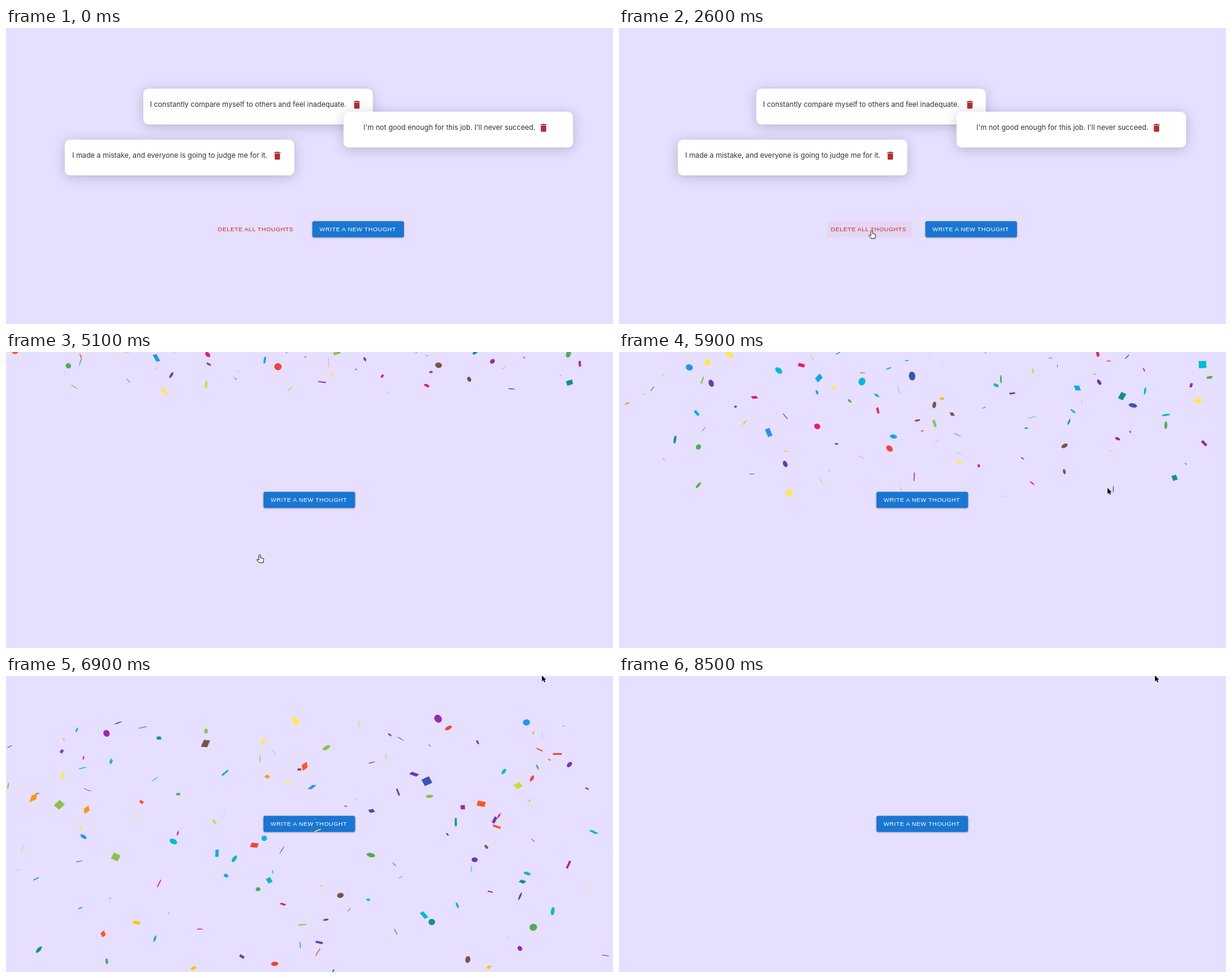
Animation, 999 px wide and 488 px high, one loop 8600 ms. Source, as an HTML page with a canvas:

```html
<!DOCTYPE html>
<html lang="en">
<head>
<meta charset="utf-8">
<title>Thoughts</title>
<style>
  html, body { margin: 0; width: 100%; height: 100%; overflow: hidden; background: #e6dfff; }
  svg, canvas { position: absolute; left: 0; top: 0; }
  .card rect { fill: #fff; filter: drop-shadow(0 3px 10px rgba(0, 0, 0, .2)); }
  .card text { font: 11.67px Inter, sans-serif; fill: #333; }
  .button { font: 9.8px "Liberation Sans", Arial, sans-serif; letter-spacing: .052em; }
  #write rect { fill: #1976d2; filter: drop-shadow(0 1px 1.2px rgba(0, 0, 0, .35)); }
  #write text { fill: #fff; }
  #delete text { fill: #c62828; }
  #hover { fill: rgba(211, 47, 47, .05); }
  #ring { fill: none; stroke: #101010; stroke-width: 1.8; }
</style>
</head>
<body>
<svg width="999" height="488" viewBox="0 0 999 488">
  <g id="thoughts">
    <g id="cards"></g>
    <g id="delete" class="button">
      <rect id="hover" x="342.5" y="318.3" width="139" height="26.7" rx="3"/>
      <rect id="ring" x="342.9" y="318.4" width="138.2" height="26.6" rx="3"/>
      <text x="348.6" y="334.9">DELETE ALL THOUGHTS</text>
    </g>
  </g>
  <g id="write" class="button">
    <rect width="150.8" height="26.5" rx="3"/>
    <text x="11.7" y="16.6">WRITE A NEW THOUGHT</text>
  </g>
</svg>
<canvas id="overlay" width="999" height="488"></canvas>
<script>
const LOOP = 8600, STEP = 100;
const CLICK = 3800, CLEARED = 4100, BURST = 4140;
const byId = id => document.getElementById(id);
const ctx = byId('overlay').getContext('2d');

const cards = [
  { x: 226, y: 100, textX: 11, text: 'I constantly compare myself to others and feel inadequate.', iconX: 342.7 },
  { x: 555.5, y: 138, textX: 32.8, text: "I'm not good enough for this job. I'll never succeed.", iconX: 320.4 },
  { x: 96.8, y: 184, textX: 12.2, text: 'I made a mistake, and everyone is going to judge me for it.', iconX: 341 }
];
byId('cards').innerHTML = cards.map(c => `
  <g class="card" transform="translate(${c.x} ${c.y})">
    <rect width="377.7" height="59" rx="8.75"/>
    <text x="${c.textX}" y="29.6">${c.text}</text>
    <g transform="translate(${c.iconX} 17.8) scale(.729)">
      <path fill="#b72d2d" d="M6 19c0 1.1.9 2 2 2h8c1.1 0 2-.9 2-2V7H6z"/>
      <path fill="#962a35" d="M19 4h-3.5l-1-1h-5l-1 1H5v2h14z"/>
    </g>
  </g>`).join('');

// Confetti: one burst from the top edge, thrown upward and pulled back by gravity.
const GRAVITY = 163, PIECES = 180;
const colors = ['#f44336', '#e91e63', '#9c27b0', '#673ab7', '#3f51b5', '#2196f3', '#03a9f4', '#00bcd4',
  '#009688', '#4caf50', '#8bc34a', '#cddc39', '#ffeb3b', '#ffc107', '#ff9800', '#ff5722', '#795548'];
let seed = 20;
const random = (min, max) => {
  seed = (seed * 16807) % 2147483647;
  return min + (max - min) * seed / 2147483647;
};
// Golden-ratio steps in x and even steps in speed keep the cloud uniform.
const pieces = Array.from({ length: PIECES }, (_, i) => ({
  shape: Math.floor(random(0, 3)),
  color: colors[Math.floor(random(0, colors.length))],
  x: i * .618034 % 1 * 999,
  vx: random(-45, 45),
  rise: 200 * ((i + random(0, 1)) / PIECES) ** .68,
  w: random(4, 14.6),
  h: random(4, 14.6),
  radius: random(3.6, 7.3),
  angle: random(0, 6.28),
  spin: random(-9, 9),
  flip: random(0, 2)
}));

function drawPiece(p, s) {
  const angle = p.angle + p.spin * s;
  const flip = Math.abs((p.flip + 4.7 * s) % 2 - 1);
  ctx.save();
  ctx.translate(p.x + p.vx * s, GRAVITY * s * s / 2 - p.rise * s);
  ctx.rotate(angle);
  ctx.scale(1, Math.max(flip, .08));
  ctx.rotate(angle);
  ctx.fillStyle = p.color;
  ctx.beginPath();
  if (p.shape === 0) ctx.arc(0, 0, p.radius, 0, 2 * Math.PI);
  else if (p.shape === 1) ctx.rect(-p.w / 2, -p.h / 2, p.w, p.h);
  else ctx.rect(-p.w / 6, -p.h / 2, p.w / 3, p.h);
  ctx.fill();
  ctx.restore();
}

const arrow = new Path2D('M0 0V10L2.4 7.8 4 11.5 5.6 10.8 4 7.2H7Z');
const hand = new Path2D('M-1.3 1a1.3 1.3 0 0 1 2.6 0V5l4 .8q1.5.4 1.3 2L5.6 11.5V13H-1L-4.2 8.8q-.7-1.6 1-1.4L-1.3 8.4Z');
// Pointer stops: time, x, y
const stops = [[700, 470, 400], [1300, 408.5, 330.5], [1600, 408.5, 330.5], [2800, 417.5, 334.5],
  [5200, 417.5, 334.5], [5500, 560, 375], [5900, 804, 224], [6300, 882, -1], [LOOP, 882, -1]];

function drawCursor(t) {
  if (t < stops[0][0]) return;
  const i = stops.findIndex(s => s[0] > t);
  const [t0, x0, y0] = stops[i - 1], [t1, x1, y1] = stops[i];
  const k = (t - t0) / (t1 - t0);
  const y = y0 + (y1 - y0) * k;
  const isHand = t <= 5200 && y < 345;
  const shape = isHand ? hand : arrow;
  ctx.save();
  ctx.translate(x0 + (x1 - x0) * k, y);
  ctx.lineWidth = .9;
  ctx.strokeStyle = isHand ? '#2a2a2a' : '#fff';
  ctx.fillStyle = isHand ? '#fff' : '#000';
  ctx.stroke(shape);
  ctx.fill(shape);
  if (isHand) ctx.stroke(shape);
  ctx.restore();
  byId('hover').style.opacity = isHand ? 1 : 0;
}

function render(time) {
  const t = Math.floor(time % LOOP / STEP) * STEP;
  const cleared = t >= CLEARED;
  byId('thoughts').style.display = cleared ? 'none' : '';
  byId('ring').style.display = t >= CLICK ? '' : 'none';
  byId('hover').style.opacity = 0;
  byId('write').setAttribute('transform', cleared ? 'translate(423.7 230.5)' : 'translate(504.2 318.4)');
  ctx.clearRect(0, 0, 999, 488);
  if (t > BURST) pieces.forEach(p => drawPiece(p, (t - BURST) / 1000));
  drawCursor(t);
}

const start = performance.now();
(function tick() {
  render(performance.now() - start);
  requestAnimationFrame(tick);
})();
</script>
</body>
</html>
```
